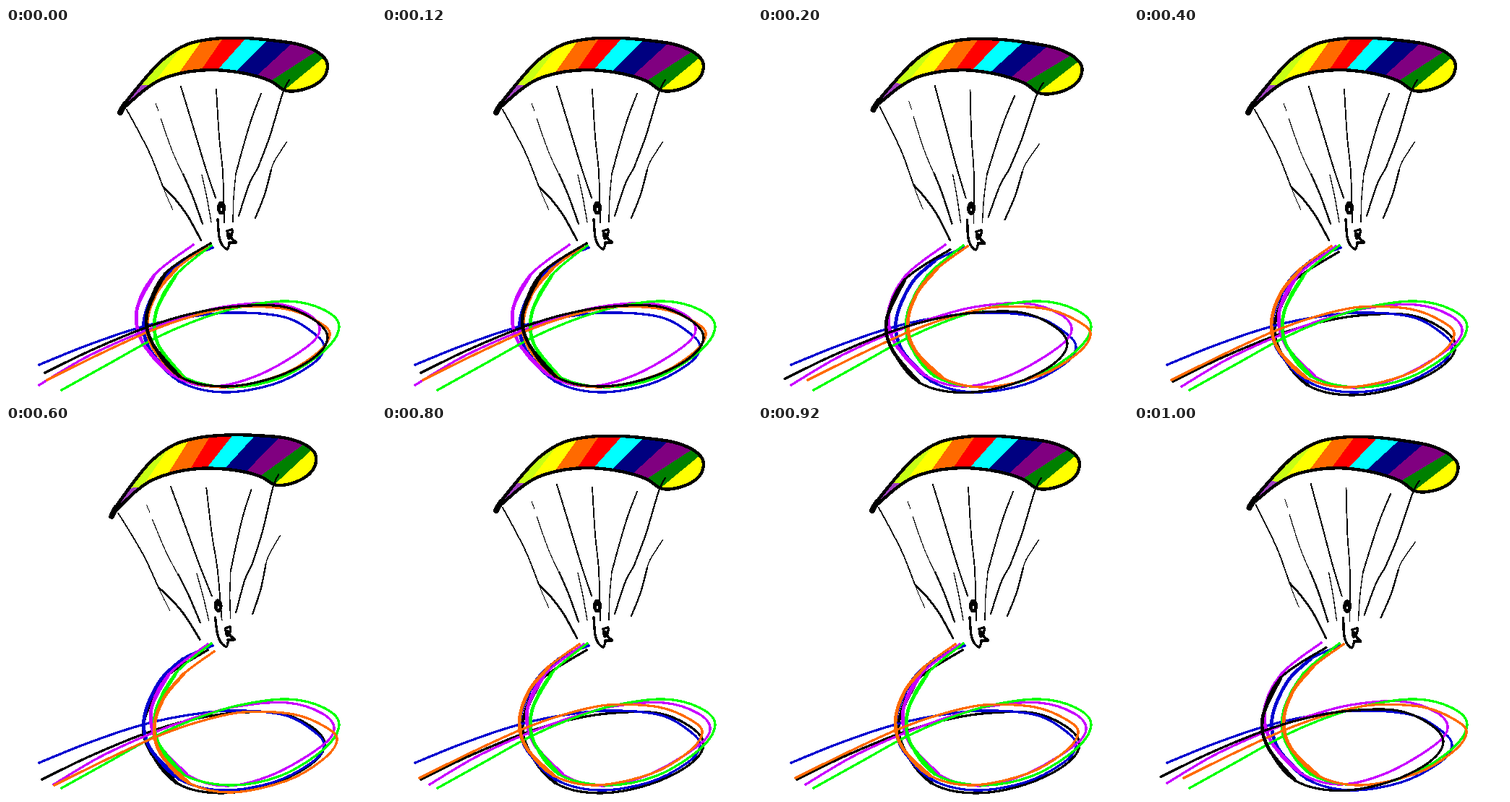
Recreate the animation shown at these times as an HTML page. Size 512 px wide and 512 px high, loop 1.2 s.

```html
<!DOCTYPE html>
<html lang="en">
<head>
<meta charset="utf-8">
<title>Paraglider</title>
<style>
  html, body { margin: 0; width: 100%; height: 100%; overflow: hidden; background: #fff; }
  svg { display: block; width: 100%; height: 100%; }
  path { fill: none; stroke-linecap: round; stroke-linejoin: round; }
</style>
</head>
<body>
<svg id="stage" viewBox="0 0 512 512" shape-rendering="crispEdges">
  <defs><clipPath id="wing"></clipPath></defs>
  <g id="trails"></g>
  <g id="glider"></g>
</svg>
<script>
const NS = 'http://www.w3.org/2000/svg';
const $ = id => document.getElementById(id);

function add(parent, tag, attrs) {
  const el = document.createElementNS(NS, tag);
  for (const key in attrs) el.setAttribute(key, attrs[key]);
  return parent.appendChild(el);
}

const parse = text => text.split(' ').map(p => p.split(',').map(Number));

// Smooth curve through points (Catmull-Rom written as cubic segments)
function spline(pts, closed) {
  const n = pts.length;
  const at = i => closed ? pts[(i + n) % n] : pts[Math.max(0, Math.min(n - 1, i))];
  let d = 'M' + pts[0];
  for (let i = 0; i < (closed ? n : n - 1); i++) {
    const [a, b, c, e] = [at(i - 1), at(i), at(i + 1), at(i + 2)];
    const c1 = b.map((v, k) => v + (c[k] - a[k]) / 6);
    const c2 = c.map((v, k) => v - (e[k] - b[k]) / 6);
    d += `C${c1} ${c2} ${c}`;
  }
  return d + (closed ? 'Z' : '');
}

function ink(points, width) {
  add($('glider'), 'path', { d: spline(parse(points)), stroke: '#000', 'stroke-width': width });
}

// Canopy
const canopy = spline(parse(
  '160,112 188,75 218,43 250,23 287,15 330,14 367,17 402,22 427,31 441,42 445,53 440,68 ' +
  '425,80 402,87 385,86 369,75 348,67 320,61 285,58 250,61 215,71 190,87'), true);
add($('wing'), 'path', { d: canopy });

// Each band runs from its lower-left edge to the far right; the next one covers the rest
const bands = [
  ['#a040c0', '150,125 150,110'],
  ['#c8ff14', '205,79 160,80'],
  ['#ffff00', '206,74 244,25'],
  ['#ff6a00', '238,64 272,16'],
  ['#ff0000', '268,61 301,13'],
  ['#00ffff', '291,60 333,13'],
  ['#000080', '316,62 363,16'],
  ['#800080', '346,67 396,21'],
  ['#008000', '365,74 430,32'],
  ['#ffff00', '384,87 443,38']
];
const cloth = add($('glider'), 'g', { 'clip-path': 'url(#wing)' });
for (const [color, edge] of bands) {
  const [low, high] = parse(edge);
  add(cloth, 'path', { d: `M${low}L${high}V0H470V130H${low[0]}Z`, style: `fill:${color}` });
}
add($('glider'), 'path', { d: canopy, stroke: '#000', 'stroke-width': 4.4 });
ink('158,117 160,113 165,105', 8);

// Suspension lines
ink('167,113 184,144 201,178 217,219', 1.8);
ink('217,219 223,234 231,252', 1);
ink('217,219 235,238 252,261 270,294', 2.8);
ink('207,104 211,115', 1);
ink('214,125 230,170 245,203', 1.2);
ink('245,202 258,232 272,271', 2.4);
ink('242,81 260,140 275,190 290,235', 2);
ink('291,85 295,150 300,200 302,269', 1.8);
ink('353,91 340,125 328,165 318,202', 2);
ink('318,202 315,235 314,268', 1.4);
ink('392,72 383,90 365,150 348,195', 2.2);
ink('348,195 337,215 322,260', 2.2);
ink('389,157 371,185 366,200', 1.4);
ink('367,196 358,230 345,263', 2.3);
ink('271,203 278,235 284,269', 1.3);

// Pilot
add($('glider'), 'ellipse', { cx: 298, cy: 249, rx: 6, ry: 9.5 });
add($('glider'), 'ellipse', { cx: 298, cy: 251, rx: 1, ry: 2, fill: '#fff' });
ink('293,265 295,289 299,300 306,306 309,299', 3.4);
ink('306,281 313,279 312,287 308,291 306,281', 3.4);
ink('309,285 313,292 318,297 309,297', 4);

// Ribbons: colour and course
const courses = {
  black: ['#000000', '54,477 120,445 195,414 250,397 310,386 380,385 425,403 445,428 425,457 370,484 300,496 240,482 203,437 195,395 220,340 283,298'],
  blue: ['#0000d0', '46,466 110,440 180,416 240,402 310,394 385,400 428,424 440,443 424,465 370,493 300,504 240,489 200,447 191,405 212,354 245,322 286,304'],
  purple: ['#c800ff', '46,494 110,456 180,424 240,402 300,386 370,381 418,396 434,418 414,443 350,480 285,496 230,480 190,437 181,390 205,342 259,300'],
  green: ['#00ff00', '77,501 140,466 205,430 260,406 320,387 390,378 440,390 461,413 440,447 380,484 310,497 245,482 210,437 208,392 235,342 284,301'],
  orange: ['#ff6a00', '69,487 140,452 210,420 270,399 330,386 400,389 445,407 460,425 440,452 390,481 315,497 255,484 218,447 207,410 220,367 248,333 290,302']
};
const ribbons = {};
for (const name in courses) {
  const [stroke, text] = courses[name];
  const pts = parse(text);
  const g = ribbons[name] = add($('trails'), 'g', { stroke });
  add(g, 'path', { d: spline(pts), 'stroke-width': 3.3 });
  add(g, 'path', { d: spline(pts.slice(11, -1)), 'stroke-width': 4.8 });
}

// Held poses: wing turn plus ribbon offsets
const poses = [
  { turn: '0', black: [0, 0], purple: [0, 0], orange: [-12, 0], blackOnTop: true },
  { turn: '1.9 277 162', black: [-17, 8.5], purple: [0, 0], orange: [0, 0], blackOnTop: true },
  { turn: '0', black: [0, 12], purple: [20, 2], orange: [-17, 0] },
  { turn: '-3.25 291 327', black: [-4, 12], purple: [20, 2], orange: [-2, 10] }
];
const order = [0, 1, 2, 3, 2, 1];
const HOLD = 200;
let shown = -1;

function draw(time) {
  const index = order[Math.floor(time / HOLD) % order.length];
  if (index === shown) return;
  shown = index;
  const pose = poses[index];
  $('glider').setAttribute('transform', `rotate(${pose.turn})`);
  for (const name of ['black', 'purple', 'orange'])
    ribbons[name].setAttribute('transform', `translate(${pose[name]})`);
  $('trails').insertBefore(ribbons.black, pose.blackOnTop ? null : ribbons.blue);
}

function tick(now) {
  draw(now);
  requestAnimationFrame(tick);
}
draw(0);
requestAnimationFrame(tick);
</script>
</body>
</html>
```
